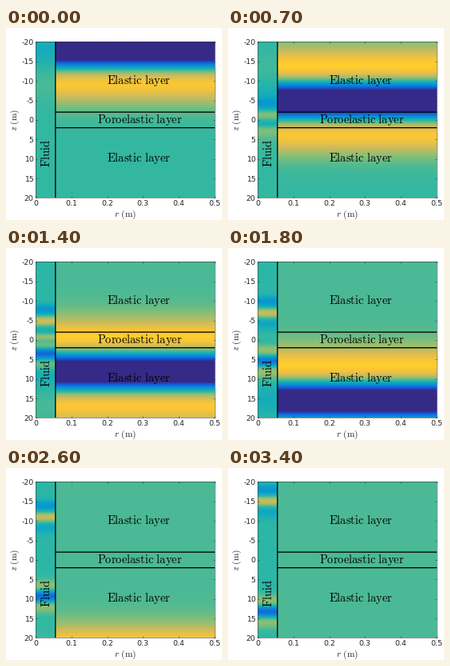
Write a matplotlib script that moves like this. It is 270x240 px and loops after 3.5 s.

```python
import numpy as np
import matplotlib.pyplot as plt
from matplotlib.animation import FuncAnimation
from matplotlib.colors import LinearSegmentedColormap

W, H, DPI = 270, 240, 72
FRAMES, STEP = 35, 100
R_WALL, R_MAX, Z_MAX, Z_LAYER = 0.055, 0.5, 20, 2
GREY = "0.15"

plt.rcParams["font.family"] = "DejaVu Sans"
plt.rcParams["mathtext.fontset"] = "cm"

# Parula-like map from evenly spaced key colours
cmap = LinearSegmentedColormap.from_list(
    "sea_sun", ["#352a87", "#0f5cdd", "#1481d6", "#06a4ca", "#2eb7a4",
                "#87bf77", "#d1bb59", "#fec832", "#f9fb0e"])

z = np.linspace(-Z_MAX, Z_MAX, 391)


def ricker(u, zero):
    """Ricker pulse with unit peak, crossing zero at +-zero."""
    x = (u / zero) ** 2
    return (1 - x) * np.exp(-x / 2)


def bump(u, width):
    return np.exp(-(u / width) ** 2)


def step(x, width):
    return 0.5 * (1 + np.tanh(x / width))


def from_front(t):
    """Distance from the centre of the wave in the solid."""
    return z - (18.7 * t - 18)


def solid(t):
    u = from_front(t)
    return 0.51 + 0.03 * step(-u - 6, 4) - 0.79 * ricker(u, 5.2)


def fluid(t):
    u = from_front(t)
    value = 0.505 - 0.012 * step(-u, 6) - 0.07 * ricker(u, 5.2)
    grow = step(t - 0.65, 0.25)

    # Tube waves leaving the layer upwards and downwards
    up = z - (2.34 - 5.1 * t)
    pulse = (0.25 * bump(up, 1.2) - 0.17 * bump(up + 2.9, 1.4)
             - 0.09 * bump(up - 2.7, 1.6))
    value += grow * pulse * step(1 - z, 0.8)

    down = z - (4.9 * t - 3.3)
    value -= grow * 0.31 * ricker(down, 1.65) * step(z - 1, 0.6)

    # Short echo inside the layer
    return value + 0.17 * bump(z + 0.8, 0.9) * bump(t - 1.4, 0.25)


fig = plt.figure(figsize=(W / DPI, H / DPI), dpi=DPI, facecolor="white")
ax = fig.add_axes([37.2 / W, 1 - 212.4 / H, 223.5 / W, 195 / H])


def strip(left, right, data):
    return ax.imshow(data[:, None], cmap=cmap, vmin=0, vmax=1, aspect="auto",
                     extent=(left, right, Z_MAX, -Z_MAX),
                     interpolation="bilinear")


fluid_im = strip(0, R_WALL, fluid(0))
solid_im = strip(R_WALL, R_MAX, solid(0))

line = dict(color="black", lw=1.3, snap=False)
ax.plot([R_WALL, R_WALL], [-Z_MAX, Z_MAX], **line)
for depth in (-Z_LAYER, Z_LAYER):
    ax.plot([R_WALL, R_MAX], [depth, depth], **line)

ax.set_xlim(0, R_MAX)
ax.set_ylim(Z_MAX, -Z_MAX)
x_ticks = np.arange(6) / 10
y_ticks = np.arange(-20, 21, 5)
ax.set_xticks(x_ticks, [f"{v:g}" for v in x_ticks])
ax.set_yticks(y_ticks, [f"{v:d}" for v in y_ticks])
ax.tick_params(direction="in", length=2.2, width=0.5, color=GREY, pad=2.5,
               top=True, right=True, labelsize=9.4, labelcolor=GREY)
for spine in ax.spines.values():
    spine.set(linewidth=0.5, color=GREY)


def label(x, y, text, size=14.5, angle=0, color="black"):
    fig.text(x / W, 1 - y / H, rf"${text}$", size=size, rotation=angle,
             color=color, ha="center", va="center")


for y in (66, 163.5):
    label(165.5, y, r"\mathrm{Elastic\ layer}")
label(167.5, 114.5, r"\mathrm{Poroelastic\ layer}")
label(50, 156.5, r"\mathrm{Fluid}", angle=90)
label(149, 233, r"r\ \mathrm{(m)}", size=11.5, color=GREY)
label(11, 115, r"z\ \mathrm{(m)}", size=11.5, angle=90, color=GREY)


def update(i):
    t = i * STEP / 1000
    fluid_im.set_data(fluid(t)[:, None])
    solid_im.set_data(solid(t)[:, None])
    return fluid_im, solid_im


anim = FuncAnimation(fig, update, frames=FRAMES, interval=STEP,
                     repeat=True, repeat_delay=0)
plt.show()
```
